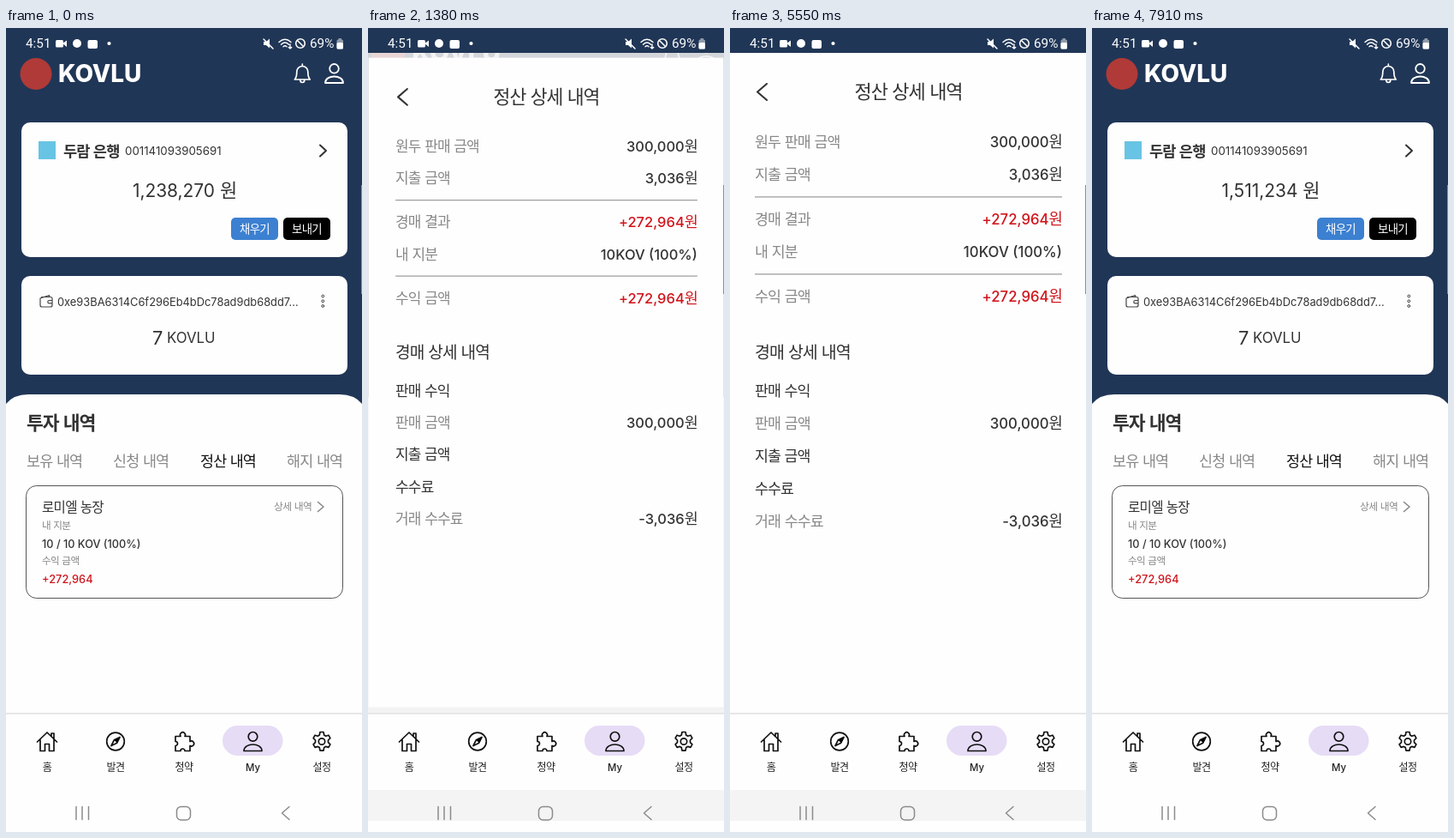
Animation of 416 by 937 pixels, one loop 8 s. Source, as an HTML page:

```html
<!DOCTYPE html>
<html lang="ko">
<head>
<meta charset="utf-8">
<style>
html, body { margin: 0; width: 100%; height: 100%; overflow: hidden; }
svg { display: block; }
text { font-family: Inter, "Noto Sans CJK KR", "Noto Sans CJK", sans-serif; white-space: pre; }
.status { font-family: Roboto, sans-serif; }
.line { fill: none; stroke-linecap: round; stroke-linejoin: round; }
</style>
</head>
<body>
<svg id="stage" width="416" height="937" viewBox="0 0 416 937"></svg>
<script>
const LOOP = 8000, STEP = 98.9;
const OPEN = 1254, CLOSE = 6250, SLIDE = 340, PAID = 6700;
const DARK = '#333', GRAY = '#888', RED = '#d0141c', PAPER = '#fefefe', NAVY = '#203656';

const rect = (x, y, w, h, fill, r = 0, more = '') =>
  `<rect x="${x}" y="${y}" width="${w}" height="${h}" fill="${fill}" rx="${r}" ${more}/>`;
const dot = (x, y, r, fill, more = '') => `<circle cx="${x}" cy="${y}" r="${r}" fill="${fill}" ${more}/>`;
const line = (d, color = '#111', w = 1.7) => `<path class="line" d="${d}" stroke="${color}" stroke-width="${w}"/>`;
const at = (x, y, body) => `<g transform="translate(${x} ${y})">${body}</g>`;

// Hangul is set tighter and a little larger than the Latin letters beside it.
const mixed = (s, size) =>
  s.replace(/[가-힣]+/g, `<tspan font-size="${size}" letter-spacing="-.05em">$&</tspan>`);
const text = (s, x, y, size, color = DARK, weight = 400, anchor = 'start', id = '') =>
  `<text id="${id}" x="${x}" y="${y}" font-size="${size * .95}" fill="${color}" font-weight="${weight}"
    text-anchor="${anchor}">${mixed(s, size)}</text>`;

const person = (color, w) => line('M12 1a5.3 5.3 0 1 1 0 10.6A5.3 5.3 0 0 1 12 1M1.5 23c0-10 21-10 21 0Z', color, w);
const bell = line('M3 19c2-2 2.5-4 2.5-9a6.5 6.5 0 0 1 13 0c0 5 .5 7 2.5 9ZM9.5 19.5a2.5 3 0 0 0 5 0M12 3.5V1', '#fff', 1.7);

const icons = [
  line('M.5 12.5 12 1.5 23.5 12.5M4 10V23H9.5V15H14.5V23H20V10M17 6V2.5H20V9'),
  dot(12, 12, 10.3, 'none', 'stroke="#111" stroke-width="1.7"') +
    line('M17 7 13.7 13.7 7 17 10.3 10.3Z') + '<path d="M17 7 13.7 13.7 10.3 10.3Z"/>',
  line('M2 6h6a3 3 0 1 1 5 0h6v6a3 3 0 1 1 0 5v6h-6a2.5 2.5 0 0 0-5 0H2v-6a2.5 2.5 0 0 0 0-5Z'),
  person('#111', 1.7),
  line('M10 1h4l.7 3.5 2 1.2 3.2-1 2 3.5-2.4 2.3v2.6l2.4 2.3-2 3.5-3.2-1-2 1.2-.7 3.5h-4l-.7-3.5-2-1.2-3.2 1-2-3.5 2.4-2.3v-2.6L2.1 8.2l2-3.5 3.2 1 2-1.2ZM12 8.3a3.7 3.7 0 1 1 0 7.4 3.7 3.7 0 0 1 0-7.4')
];

function homePage() {
  const tabs = [['보유 내역', 24], ['신청 내역', 125], ['정산 내역', 227], ['해지 내역', 328]];
  return rect(0, 28, 416, 770, NAVY) +
    dot(35, 53.5, 18.5, '#b03a37') +
    text('KOVLU', 61, 62.5, 29.4, '#fff', 800) +
    at(334.3, 41, bell) + at(371.5, 41, person('#fff', 1.8)) +
    rect(18, 110, 381, 157, PAPER, 10) +
    rect(38, 132, 20, 21, '#68c4e4') +
    text('두람 은행', 67, 149.5, 17.6, DARK, 600) +
    text('001141093905691', 139, 148, 14) +
    line('M367 136.5 374 143 367 149.5', DARK, 2) +
    text('1,238,270 원', 208.5, 197, 22, DARK, 400, 'middle', 'balance') +
    rect(263, 221, 55, 26, '#3c80d1', 5) + text('채우기', 290.5, 238.5, 13.4, '#fff', 500, 'middle') +
    rect(324, 221, 55, 26, '#000', 5) + text('보내기', 351.5, 238.5, 13.4, '#fff', 500, 'middle') +
    rect(18, 289, 381, 115, PAPER, 10) +
    line('M41.5 313.5H52a2 2 0 0 1 2 2V323a2 2 0 0 1-2 2H42a2 2 0 0 1-2-2V315L50.5 311.5V313.5M54 317.5H50.5a1.7 1.7 0 0 0 0 3.4H54', '#444', 1.2) +
    text('0xe93BA6314C6f296Eb4bDc78ad9db68dd7...', 60, 324, 13.55) +
    [312.5, 318.3, 324].map(y => dot(370.3, y, 1.4, 'none', 'stroke="#333"')).join('') +
    text('7', 171, 369, 23) + text('KOVLU', 188, 367, 17.7) +
    `<path d="M0 438Q9 427 26 427H390Q407 427 416 438V798H0Z" fill="${PAPER}"/>` +
    text('투자 내역', 24, 468, 21.6, DARK, 600) +
    tabs.map(([s, x], i) => text(s, x, 511, 17.4, i == 2 ? '#111' : GRAY, i == 2 ? 500 : 400)).join('') +
    rect(23.5, 533.5, 370, 131, 'none', 12, 'stroke="#555"') +
    text('로미엘 농장', 42, 563.5, 15.6, DARK, 500) +
    text('상세 내역', 313, 562, 11.8, GRAY) + line('M364.5 552.5 371 558 364.5 563.5', GRAY, 1.6) +
    text('내 지분', 42, 584, 11.6, GRAY) +
    text('10 / 10 KOV (100%)', 42, 605.5, 13.4, DARK, 500) +
    text('수익 금액', 42, 625, 11.6, GRAY) +
    text('+272,964', 42, 646.5, 13.5, RED, 500);
}

function detailPage() {
  const rows = [
    ['원두 판매 금액', 139, '300,000원'], ['지출 금액', 177, '3,036원'],
    ['경매 결과', 229, '+272,964원', RED], ['내 지분', 267, '10KOV (100%)'],
    ['수익 금액', 319, '+272,964원', RED],
    ['판매 금액', 467, '300,000원'], ['거래 수수료', 581, '-3,036원']
  ];
  const heads = [['판매 수익', 429], ['지출 금액', 505], ['수수료', 543]];
  return rect(-3, 28, 422, 770, PAPER) +
    line('M43 65 32 74.5 43 84', DARK, 2.1) +
    text('정산 상세 내역', 208.5, 82, 22, DARK, 500, 'middle') +
    rows.map(([name, y, value, color = DARK]) =>
      text(name, 29, y, 17.3, GRAY) + text(value, 388, y, 17.7, color, 500, 'end')).join('') +
    rect(29, 196.3, 359, 1.2, '#999') + rect(29, 286.3, 359, 1.2, '#999') +
    text('경매 상세 내역', 29, 385, 19.5, DARK, 500) +
    heads.map(([s, y]) => text(s, 29, y, 17.3, DARK, 500)).join('');
}

function statusBar() {
  const label = (s, x) => `<text class="status" x="${x}" y="23.3" font-size="15.3" fill="#fff">${s}</text>`;
  return rect(0, 0, 416, 29, NAVY) + label('4:51', 23) + label('69%', 355) +
    rect(58, 14, 9, 8.5, '#fff', 1.5) + '<path d="M66 18 71 14.5V22Z" fill="#fff"/>' +
    dot(83, 18, 5, '#fff') + rect(95.5, 14, 11.5, 10, '#fff', 2) + dot(120.5, 18, 2.1, '#fff') +
    '<path d="M301 16H304L308 12.5V23.5L304 20H301Z" fill="#fff"/>' +
    line('M301 13 312 24', '#fff', 1.5) +
    line('M319 16.5Q326 10 333 16.5M321.5 19.2Q326 15 330.5 19.2M324 21.7Q326 20 328 21.7M332 19V24M330.3 22.5 332 24 333.7 22.5', '#fff', 1.4) +
    dot(344, 18, 5.3, 'none', 'stroke="#fff" stroke-width="1.6"') + line('M340.5 14.5 347.5 21.5', '#fff', 1.5) +
    rect(386.5, 13.5, 7.5, 11, '#8f9bab', 1.5) + rect(388.5, 12, 3.5, 2, '#8f9bab') +
    rect(386.5, 17, 7.5, 7.5, '#fff', 1.5);
}

function bottomBars() {
  const centers = [48, 128, 208, 288.5, 369];
  return rect(0, 798, 416, 90, '#fefefe') + rect(0, 798.3, 416, 1.3, '#dcdcdc') +
    rect(253, 813, 70.5, 35, '#e6dcf6', 17.5) +
    icons.map((icon, i) => at(centers[i] - 12, 819.5, icon)).join('') +
    ['홈', '발견', '청약', 'My', '설정'].map((s, i) => text(s, centers[i], 866, 12, '#222', 500, 'middle')).join('') +
    rect(0, 888, 416, 36, '#fefefe', 0, 'id="system"') + rect(0, 924, 416, 13, '#fefefe') +
    line('M82 907.5V922.5M89 907.5V922.5M96.5 907.5V922.5', '#8b8b8b', 1.5) +
    rect(199.5, 907.5, 16, 15.5, 'none', 5, 'stroke="#8b8b8b" stroke-width="1.5"') +
    line('M331 907.5 322.5 915 331 922.5', '#8b8b8b', 1.5) +
    rect(415, 183, 1, 127, '#8a8f98');
}

const $ = id => document.getElementById(id);
$('stage').innerHTML = rect(0, 0, 416, 937, '#f2f2f2') +
  `<svg y="28" width="416" height="770" viewBox="0 28 416 770">
    <g id="home">${homePage()}</g><g id="detail">${detailPage()}</g></svg>` +
  statusBar() + bottomBars();

const clamp = v => Math.max(0, Math.min(1, v));

// Cubic Bézier easing (.20833, .82, .25, 1), solved by bisection.
function ease(x) {
  if (x <= 0 || x >= 1) return clamp(x);
  const bez = (a, b, u) => 3 * a * (1 - u) ** 2 * u + 3 * b * (1 - u) * u * u + u ** 3;
  let lo = 0, hi = 1;
  for (let i = 0; i < 24; i++) {
    const mid = (lo + hi) / 2;
    if (bez(.20833, .25, mid) < x) lo = mid; else hi = mid;
  }
  return bez(.82, 1, lo);
}

function pose(id, scale, opacity) {
  const g = $(id);
  g.setAttribute('transform', `translate(208 413) scale(${scale}) translate(-208 -413)`);
  g.setAttribute('opacity', opacity);
  g.setAttribute('visibility', opacity > 0 ? 'visible' : 'hidden');
}

let paid = false;
function draw(now) {
  const t = Math.floor((now % LOOP) / STEP + .15) * STEP;
  const closing = t >= CLOSE;
  const p = closing ? 1 - ease((t - CLOSE) / SLIDE) : ease((t - OPEN) / SLIDE);
  pose('home', 1 + .075 * p, clamp(1 - (p - .2075) / .7925));
  pose('detail', closing ? .925 + .075 * p : .85 + .15 * p, clamp((p - .75) / .125));
  $('system').setAttribute('fill', t > 1180 && !closing ? '#f4f4f4' : '#fefefe');
  if (paid != t >= PAID) {
    paid = !paid;
    $('balance').innerHTML = mixed(paid ? '1,511,234 원' : '1,238,270 원', 22);
  }
}
const start = performance.now();
function tick() {
  draw(performance.now() - start);
  requestAnimationFrame(tick);
}
tick();
</script>
</body>
</html>
```
